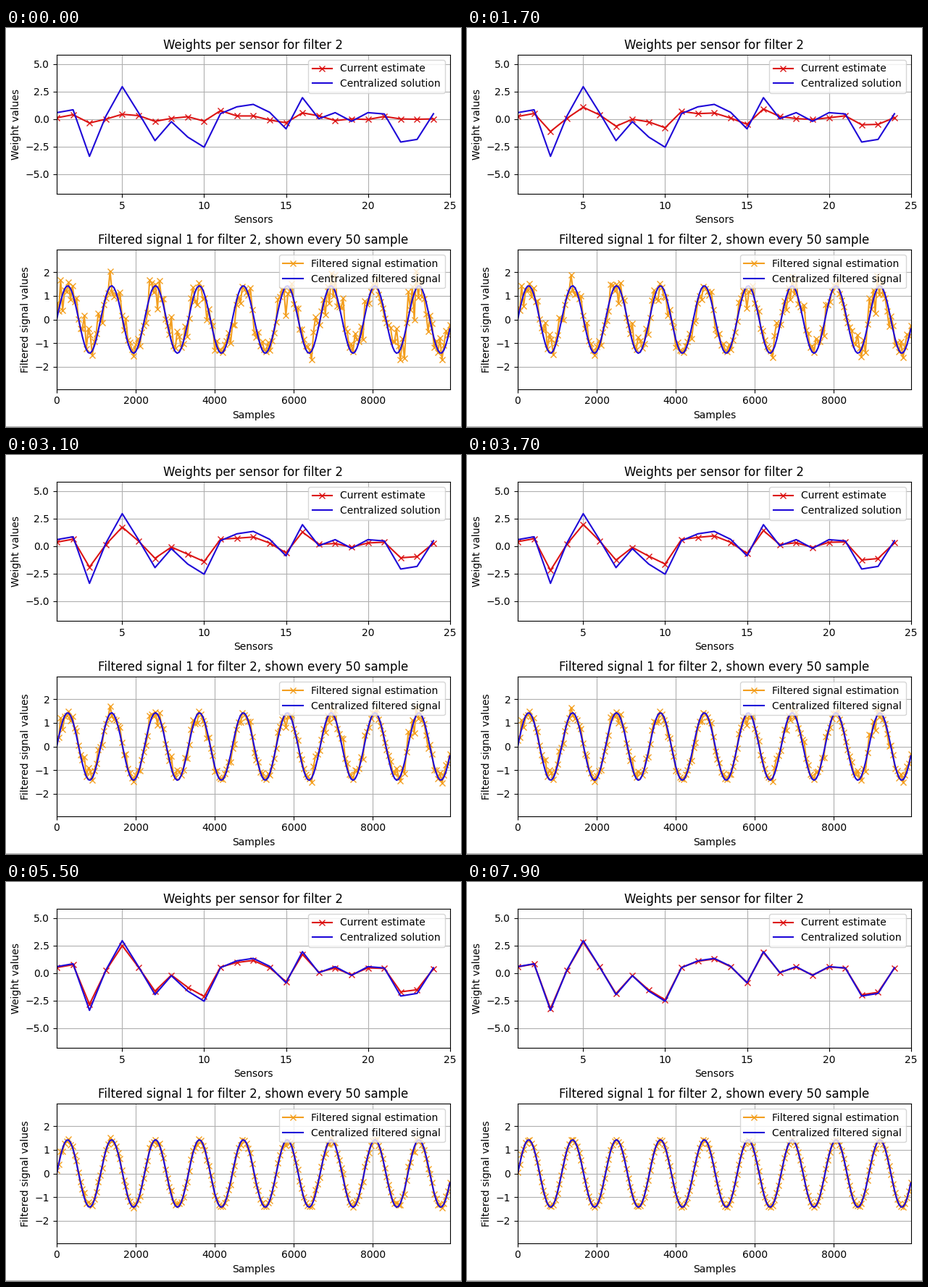
A matplotlib script for the animation above (8000 ms loop, 628x551 px).

```python
import numpy as np
import matplotlib.pyplot as plt
from matplotlib.animation import FuncAnimation
from matplotlib.lines import Line2D

W, H, DPI = 628, 551, 100
LEFT, RIGHT = 70, 612.6
FRAMES, STEP = 80, 100
RED, BLUE, ORANGE = "#dc1414", "#1e08d8", "#f39f1f"

sensors = np.arange(1, 25)
solution = np.array([
    .57, .83, -3.4, .25, 2.93, .55, -1.97, -.25, -1.65, -2.57, .48, 1.1,
    1.32, .6, -.9, 1.93, .02, .57, -.22, .57, .45, -2.1, -1.86, .47])
start = np.array([
    .1, .38, -.37, -.02, .42, .3, -.22, .05, .2, -.2, .75, .27,
    .27, -.1, -.35, .55, .28, -.15, 0, -.05, .22, 0, -.03, 0])

samples = np.arange(0, 10000, 50)
clean = 1.43 * np.sin(2 * np.pi * 9 * samples / 10000)

# Heavy-tailed error, pulled slightly towards zero signal
rng = np.random.default_rng(4)
error = np.clip(rng.laplace(0, .32, samples.size), -1.1, 1.1) - .1 * clean


def remaining(t):
    """Share of the initial error left after t seconds."""
    return np.exp(-(t / 3.85) ** 1.5)


def add_panel(top, bottom, title, xlabel, ylabel, xlim, ylim, xticks, yticks):
    ax = fig.add_axes([LEFT / W, 1 - bottom / H, (RIGHT - LEFT) / W, (bottom - top) / H])
    ax.set(title=title, xlabel=xlabel, ylabel=ylabel, xlim=xlim, ylim=ylim,
           xticks=xticks, yticks=yticks)
    ax.grid(True)
    return ax


def add_lines(ax, x, moving, fixed, color, labels):
    line, = ax.plot(x, moving, "x-", color=color, label=labels[0])
    ax.plot(x, fixed, color=BLUE, label=labels[1])
    ax.legend(loc="upper right")
    return line


fig = plt.figure(figsize=(W / DPI, H / DPI), dpi=DPI, facecolor="white")
fig.add_artist(Line2D([0, 1], [1.5 / H] * 2, color="#b4b4b4", lw=.8))

ax_w = add_panel(36.9, 229.1, "Weights per sensor for filter 2", "Sensors",
                 "Weight values", (1, 25), (-6.81, 5.83),
                 range(5, 26, 5), np.arange(-5, 5.1, 2.5))
estimate = add_lines(ax_w, sensors, start, solution, RED,
                     ("Current estimate", "Centralized solution"))

ax_s = add_panel(306.4, 498.7, "Filtered signal 1 for filter 2, shown every 50 sample",
                 "Samples", "Filtered signal values", (0, 9950), (-2.95, 2.95),
                 range(0, 8001, 2000), range(-2, 3))
filtered = add_lines(ax_s, samples, clean + error, clean, ORANGE,
                     ("Filtered signal estimation", "Centralized filtered signal"))


def update(frame):
    gap = remaining(frame * STEP / 1000)
    estimate.set_ydata(solution + gap * (start - solution))
    filtered.set_ydata(clean + gap * error)
    return estimate, filtered


anim = FuncAnimation(fig, update, frames=FRAMES, interval=STEP, repeat=True, repeat_delay=0)
plt.show()
```
